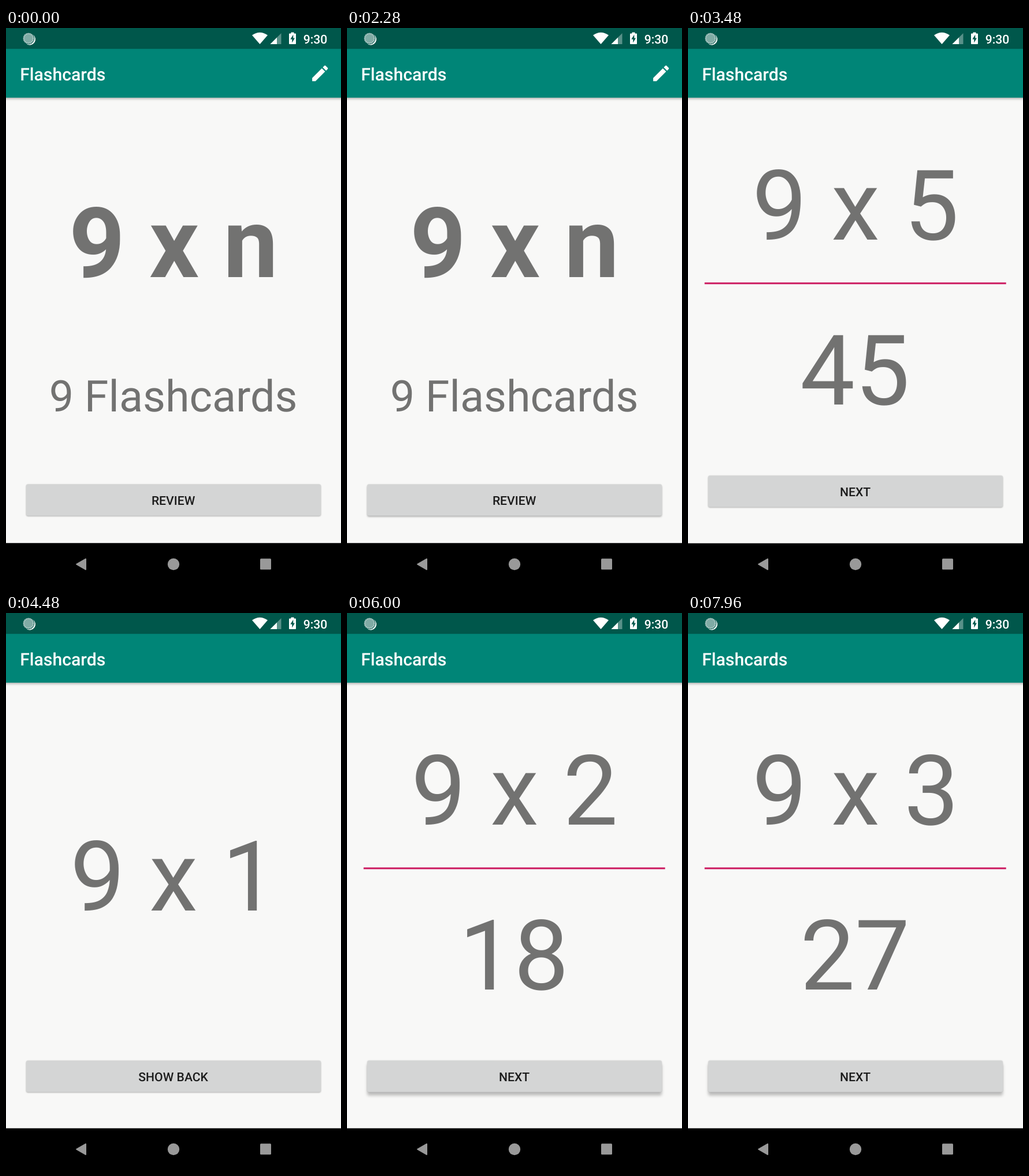
Write an HTML page that moves like this. It is 580 by 966 pixels and loops after 8 s.

```html
<!DOCTYPE html>
<html lang="en">
<head>
<meta charset="utf-8">
<title>Flashcards</title>
<style>
  html, body { margin: 0; width: 100%; height: 100%; overflow: hidden; background: #000; }
  svg { display: block; width: 580px; height: 966px; font-family: Roboto, sans-serif; }
  text { text-rendering: geometricPrecision; }
  .page { fill: #f8f8f7; }
  .mid { text-anchor: middle; fill: #000; fill-opacity: .54; }
  .big { font-size: 169.2px; }
  .bold { font-weight: 700; }
  .count { font-size: 75.5px; }
  .label { font-size: 21.15px; font-weight: 500; fill-opacity: .87; }
  .title { font-size: 30.2px; font-weight: 500; fill: #fff; }
  .bar { filter: drop-shadow(0 2px 2px rgba(0, 0, 0, .3)); }
</style>
</head>
<body>
<svg viewBox="0 0 580 966">
  <defs>
    <g id="appbar">
      <rect class="bar" x="-10" y="30" width="600" height="90.8" fill="#008577"/>
      <rect width="580" height="36.2" fill="#00574b"/>
      <text class="title" x="24.2" y="90.7">Flashcards</text>
    </g>
    <rect id="button" x="35" y="0" width="510" height="54.5" rx="3" fill="#d4d5d5"/>
  </defs>

  <rect class="page" width="580" height="893.5"/>
  <g id="pager"></g>
  <use href="#appbar"/>
  <path transform="translate(525.6 60.6) scale(1.51)" fill="#fff" d="M3 17.25V21h3.75L17.81 9.94l-3.75-3.75L3 17.25zM20.71 7.04a1 1 0 0 0 0-1.41l-2.34-2.34a1 1 0 0 0-1.41 0l-1.83 1.83 3.75 3.75 1.83-1.83z"/>
  <rect y="893.5" width="580" height="72.5"/>

  <g id="review">
    <rect class="page" width="580" height="893.5"/>
    <use href="#appbar"/>
    <text id="question" class="mid big" x="290"></text>
    <g id="back">
      <rect x="28.7" y="441.3" width="522" height="3" fill="#cc1a60"/>
      <text id="answer" class="mid big" x="289" y="653"></text>
    </g>
    <use id="cardButton" href="#button" y="776.3"/>
    <text id="action" class="mid label" x="289.6" y="811.7"></text>
  </g>

  <g fill="#fff">
    <circle cx="39" cy="18" r="9.5" fill-opacity=".5"/>
    <circle cx="39" cy="18" r="8" fill="none" stroke="#fff" stroke-opacity=".4" stroke-width="2" stroke-dasharray="1.5 1.5"/>
    <path d="M47 11.5A10.3 10.3 0 0 1 35 27.5A10 10 0 0 0 47 11.5Z"/>
    <path d="M426 12.5Q439.5 3 453 12.5L439.5 28Z"/>
    <path d="M476.5 9V28H457.5Z" fill-opacity=".35"/>
    <path d="M469 16.5V28H457.5Z"/>
    <path d="M493.5 9.5V7.5H498.5V9.5H501Q502 9.5 502 10.5V27Q502 28 501 28H491Q490 28 490 27V10.5Q490 9.5 491 9.5Z"/>
    <path d="M497.3 11.5L492.3 19.5H495.3V25.5L500 17.5H497.3Z" fill="#00574b"/>
    <text x="514.7" y="26.5" font-size="21.15" font-weight="500">9:30</text>
    <g fill-opacity=".6">
      <path d="M121.5 929.2Q120.5 930 121.5 930.8L137.5 940Q139 940.5 139 939V921Q139 919.5 137.5 920Z"/>
      <circle cx="290" cy="930" r="10.2"/>
      <rect x="440" y="920.3" width="19" height="19" rx="1.5"/>
    </g>
  </g>
</svg>
<script>
const LOOP = 8000;
const $ = id => document.getElementById(id);
const clamp = v => Math.min(1, Math.max(0, v));
const ramp = (t, from, to) => clamp((t - from) / (to - from));

// [time, multiplier, back shown, button ends raised]
const cards = [
  [0, 5, false, false],
  [3400, 5, true, false],
  [4480, 1, false, true],
  [4960, 1, true, false],
  [5400, 2, false, true],
  [5920, 2, true, true],
  [6480, 7, false, true],
  [6880, 7, true, true],
  [7440, 3, false, true],
  [7880, 3, true, true],
];

const deck = (n, x) => `<g transform="translate(${x})">
  <text class="mid big bold" x="290" y="432">${n} x n</text>
  <text class="mid count" x="289.6" y="664.8">9 Flashcards</text>
  <use class="deckButton" href="#button" y="791.3"/>
  <text class="mid label" x="289.6" y="826.7">REVIEW</text></g>`;
$('pager').innerHTML = deck(8, -580) + deck(9, 0);
const [otherButton, deckButton] = document.querySelectorAll('.deckButton');
otherButton.style.filter = shadow(0);

// Ambient rim plus a drop that grows as the button rises
function shadow(z) {
  return `drop-shadow(0 0 1px rgba(0,0,0,${.06 + .1 * z}))
    drop-shadow(0 ${1.6 + 4.6 * z}px ${1.2 + 1.6 * z}px rgba(0,0,0,${.28 - .04 * z}))`;
}

// Finger drag followed by a decelerating settle
function swipe(u) {
  return u < .4 ? .45 * (u / .4) ** 1.5 : 1 - .55 * ((1 - u) / .6) ** 4;
}

function drawHome(t) {
  const x = 580 * (swipe(ramp(t, 40, 840)) - swipe(ramp(t, 880, 1400)));
  $('pager').setAttribute('transform', `translate(${x})`);
  deckButton.style.filter = shadow(ramp(t, 2260, 2420) - ramp(t, 2560, 2700));
}

function drawReview(t) {
  const alpha = t < 2700 ? 0 : 1 - (1 - ramp(t, 2670, 2870)) ** 4;
  const shift = 77.3 * (1 - ramp(t, 2670, 3020)) ** 5;
  $('review').setAttribute('opacity', alpha);
  $('review').setAttribute('transform', `translate(0 ${shift})`);

  const [start, n, back, raised] = cards.findLast(card => card[0] <= t);
  const rise = Math.min(1, Math.floor((t - start) / 40) / 2);
  let z = raised ? rise : back && rise < 1 ? .5 : 0;
  if (t >= 4040 && t < 4480) z = .4;

  $('question').textContent = `9 x ${n}`;
  $('question').setAttribute('y', back ? 367 : 516);
  $('answer').textContent = 9 * n;
  $('back').setAttribute('visibility', back ? 'visible' : 'hidden');
  $('action').textContent = back ? 'NEXT' : 'SHOW BACK';
  $('cardButton').style.filter = shadow(z);
}

function frame() {
  const t = performance.now() % LOOP;
  drawHome(t);
  drawReview(t);
  requestAnimationFrame(frame);
}
frame();
</script>
</body>
</html>
```
